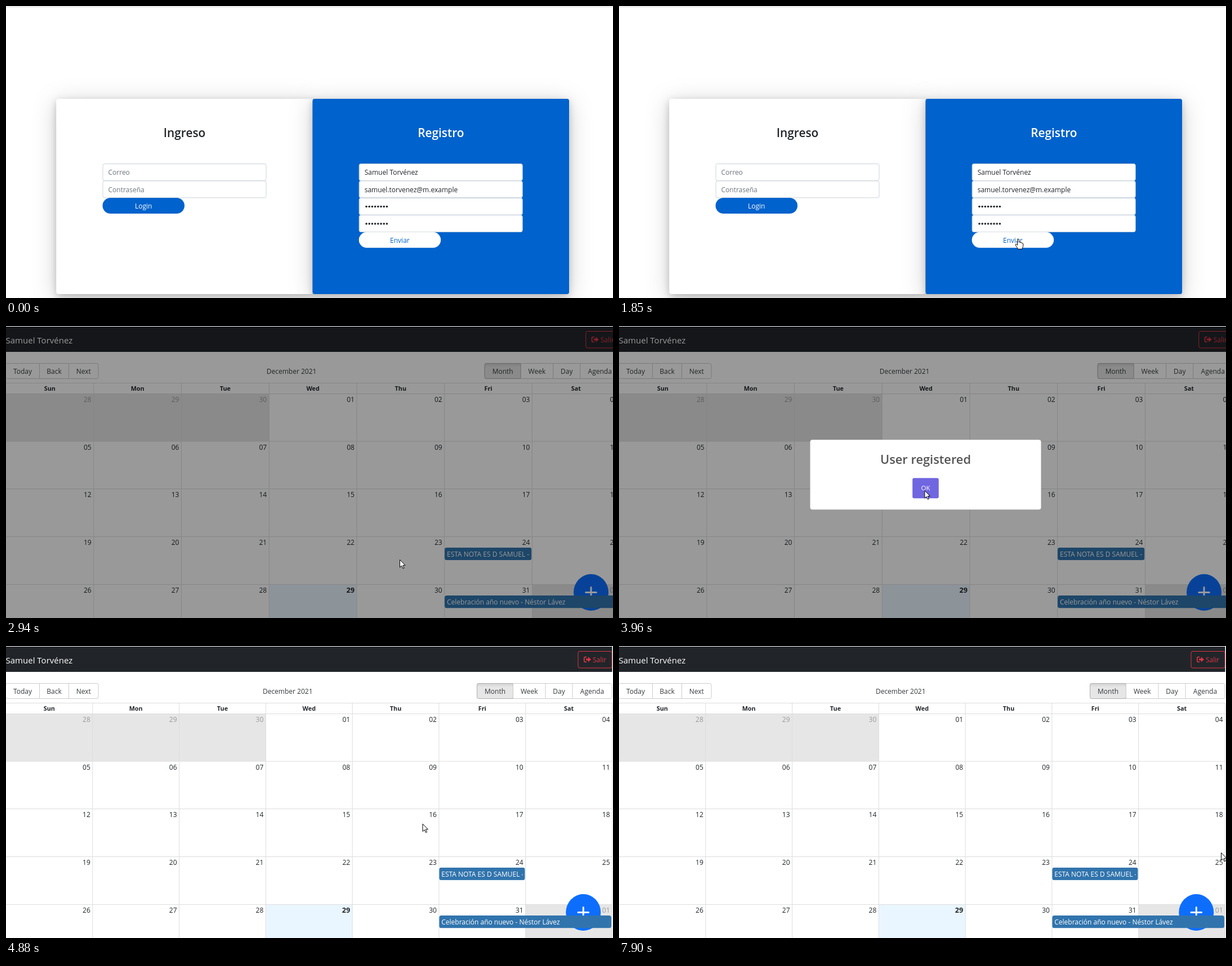
An HTML page for the animation above (8 s loop, 1078x519 px).

```html
<!DOCTYPE html>
<html lang="es">
<head>
<meta charset="utf-8">
<title>Agenda</title>
<style>
html, body { margin: 0; width: 100%; height: 100%; overflow: hidden; background: #fff; }
svg { display: block; }
text { font-family: "Open Sans", "Noto Sans", sans-serif; white-space: pre; }
.soft { filter: drop-shadow(0 7.2px 20.8px rgba(0,0,0,.19)); }
.near { filter: drop-shadow(0 4px 6.4px rgba(0,0,0,.2)); }
</style>
</head>
<body>
<svg id="stage" width="1078" height="519" viewBox="0 0 1078 519">
  <defs>
    <linearGradient id="press" x2="0" y2="1">
      <stop offset="0" stop-color="#d2d2d2"/><stop offset=".25" stop-color="#e6e6e6"/>
    </linearGradient>
  </defs>
  <g id="login"></g>
  <g id="wide"></g>
  <g id="narrow"></g>
  <rect id="status" x="-2" y="510.5" width="362.5" height="20" rx="3" fill="#f1f3f4" stroke="#cfd2d6"/>
  <rect id="shade" y="1" width="1078" height="518"/>
  <g id="modal"></g>
  <path id="arrow" d="M.5.5V14L3.7 11.1 6 16 8 15.1 5.8 10.3H10Z" fill="#fff" stroke="#000" stroke-linejoin="round"/>
  <path id="hand" d="M-1.4 8V1.2C-1.4-.4 1.3-.4 1.3 1.2V6.2C1.6 5 4 5.2 4 6.8 4.5 5.8 6.5 6.2 6.5 7.7 7.2 7 8.7 7.4 8.7 8.8V12.5C8.7 14.4 7.3 15.4 7 18H-.6C-1 15.6-3.5 13.7-4.9 10.7-5.4 9.1-3.5 8.6-2.6 9.8L-1.4 11.2Z" fill="#fff" stroke="#000" stroke-linejoin="round"/>
</svg>
<script>
const LOOP = 8000;
const USER = "Samuel Torvénez";
const $ = id => document.getElementById(id);
const BLUE = "#0062cc", INK = "#212529";

const rect = (x, y, w, h, fill, more = "") =>
  `<rect x="${x}" y="${y}" width="${w}" height="${h}" fill="${fill}" ${more}/>`;
const text = (x, y, str, fill = INK, size = 12, more = "") =>
  `<text x="${x}" y="${y}" fill="${fill}" font-size="${size}" ${more}>${str}</text>`;
const MID = 'text-anchor="middle"', END = 'text-anchor="end"';
const line = (x1, y1, x2, y2) => `<path d="M${x1} ${y1}L${x2} ${y2}" stroke="#ddd"/>`;

// ---- sign-in page ----
function card(x, fill, title, ink) {
  const shape = cls => rect(x, 165, 455.3, 347, fill, `rx="4" class="${cls}"`);
  return shape("soft") + shape("near") +
    text(x + 227.7, 233, title, ink, 20.8, MID + ' font-weight="600"');
}
const field = (x, row, str, ink) =>
  rect(x + .5, 280.5 + row * 30.4, 290, 29.9, "#fff", 'rx="3" stroke="#ced4da"') +
  text(x + 10, 300.3 + row * 30.4, str, ink);
const pill = (x, y, str, fill, ink) =>
  rect(x, y, 145.5, 28, fill, 'rx="14"') + text(x + 72.7, y + 18.8, str, ink, 12, MID);
const dots = y => Array.from({ length: 8 }, (_, i) =>
  `<circle cx="${640 + i * 5.2}" cy="${y}" r="1.8" fill="${INK}"/>`).join("");

$("login").innerHTML =
  rect(0, 1, 1078, 1, "#d3d3d3") +
  card(89.3, "#fff", "Ingreso", INK) +
  field(171.5, 0, "Correo", "#6c757d") + field(171.5, 1, "Contraseña", "#6c757d") +
  pill(171.5, 341, "Login", BLUE, "#fff") +
  card(544.6, BLUE, "Registro", "#fff") +
  field(626.7, 0, USER, INK) + field(626.7, 1, "samuel.torvenez@m.example", INK) +
  field(626.7, 2, "", INK) + field(626.7, 3, "", INK) + dots(356.5) + dots(387) +
  pill(626.7, 401.8, "Enviar", "#fff", BLUE);

// ---- calendar page, laid out for a given width ----
const ROWS = [120.5, 205, 289.5, 374.5, 459.5, 545];

function group(edges, labels, active) {
  const a = edges[0], b = edges[edges.length - 1];
  let s = rect(a, 66.5, b - a, 27, "#fff", 'rx="3" stroke="#ccc"');
  labels.forEach((name, i) => {
    const l = edges[i], r = edges[i + 1];
    if (i) s += `<path d="M${l} 66.5v27" stroke="#ccc"/>`;
    if (name === active) s += rect(l, 66.5, r - l, 27, "url(#press)", 'rx="3" stroke="#adadad"');
    s += text((l + r) / 2, 84.5, name, "#373a3c", 12, MID);
  });
  return s;
}

const eventBar = (x, y, w, str) =>
  `<svg x="${x}" y="${y}" width="${w}" height="22.5">` +
  rect(0, 0, w, 22.5, "#3174ad", 'rx="4"') +
  `<svg width="${w - 4}" height="22">${text(4, 16, str, "#fff")}</svg></svg>`;

function calendar(W) {
  const col = W / 7, off = W - 1076.5, cell = "#e6e6e6";
  let s = rect(0, 0, 1078, 519, "#fff") + rect(0, 1, W, 45, INK) +
    text(-.5, 30.5, USER, "#fff", 15);

  s += `<g transform="translate(${off} 0)">` +
    rect(1016, 9.5, 60, 29.5, "none", 'rx="3" stroke="#dc3545"') +
    '<path d="M1031 19.6h-2.6q-1.6 0-1.6 1.6v5.6q0 1.6 1.6 1.6h2.6" fill="none" stroke="#dc3545" stroke-width="1.7"/>' +
    '<path d="M1030 22.6h3.8v-3.4l5.2 4.8-5.2 4.8v-3.4h-3.8z" fill="#dc3545"/>' +
    text(1042, 28.5, "Salir", "#dc3545") +
    group([836.5, 900.5, 958, 1006, 1076], ["Month", "Week", "Day", "Agenda"], "Month") + "</g>";
  s += group([-.5, 59.5, 111.5, 164], ["Today", "Back", "Next"]) +
    text(W / 2 - 38, 84.5, "December 2021", "#373a3c", 12, MID);

  s += rect(0, ROWS[0], col * 3, ROWS[1] - ROWS[0], cell) +
    rect(col * 3, ROWS[4], col, 60, "#eaf6ff") + rect(col * 6, ROWS[4], col, 60, cell);
  s += line(0, 101.5, W, 101.5);
  for (let r = 0; r < 5; r++) s += line(0, ROWS[r], W, ROWS[r]);
  "Sun Mon Tue Wed Thu Fri Sat".split(" ").forEach((day, c) => {
    const right = (c + 1) * col;
    s += line(right, 101.5, right, 519) +
      text(right - col / 2, 115, day, INK, 10.8, MID + ' font-weight="700"');
    for (let r = 0; r < 5; r++) {
      const date = new Date(2021, 10, 28 + r * 7 + c);
      const inside = date.getMonth() === 11, today = inside && date.getDate() === 29;
      s += text(right - 4, ROWS[r] + 14.8, String(date.getDate()).padStart(2, "0"),
        inside ? INK : "#999", today ? 12.6 : 12, END + (today ? ' font-weight="700"' : ""));
    }
  });

  s += `<g transform="translate(${off} 0)"><ellipse cx="1025.3" cy="473.5" rx="31" ry="32.5" fill="#0d6efd"/>` +
    '<path d="M1016 473.5h18.6M1025.3 464.5v18" stroke="#fff" stroke-width="3" stroke-linecap="round"/></g>';
  return s + eventBar(col * 5 + .3, 393.7, col - 1.3, "ESTA NOTA ES D SAMUEL -") +
    eventBar(col * 5 + .3, 479, col * 2 - 1.8, "Celebración año nuevo - Néstor Lávez");
}
$("wide").innerHTML = calendar(1090.2);
$("narrow").innerHTML = calendar(1076.5);

$("modal").innerHTML = rect(-205, -62, 410, 124, "#fff", 'rx="4"') +
  text(0, -19, "User registered", "#545454", 21.8, MID + ' font-weight="600"') +
  `<g id="ok">${rect(-23.3, 6, 46.6, 36, "#7066e0", 'rx="3"')}${text(0, 28, "OK", "#fff", 11.5, MID)}</g>`;

// ---- motion ----
const GONE = 2450, CALENDAR = 2940, POPUP = 3010, CLOSE = 4153, CLOSED = CLOSE + 150;

// time, x, y of the pointer tip
const PATH = [
  [100, 967, 497], [500, 908, 458], [900, 858, 430], [1350, 765, 421], [1750, 712, 412],
  [1850, 709, 414], [2640, 699, 415], [3300, 699, 415], [4000, 541, 291], [4540, 541, 291],
  [4740, 660, 362], [4880, 739, 316], [5340, 936, 164], [5580, 978, 66], [5800, 1066, 112],
  [6030, 1040, 215], [6240, 1056, 256], [6370, 1057, 441], [6600, 1040, 464], [7020, 992, 452],
  [7300, 1008, 486], [7600, 1045, 440], [7900, 1069, 367]
];

// smooth curve through the points that never overshoots them
function along(k, t) {
  const n = PATH.length - 1;
  const slope = i => i < 0 || i >= n ? 0 : (PATH[i + 1][k] - PATH[i][k]) / (PATH[i + 1][0] - PATH[i][0]);
  const tangent = i => {
    const a = slope(i - 1), b = slope(i);
    return a * b > 0 ? 2 * a * b / (a + b) : 0;
  };
  if (t >= PATH[n][0]) return PATH[n][k];
  const i = Math.max(0, PATH.findIndex(p => p[0] > t) - 1);
  const h = PATH[i + 1][0] - PATH[i][0], u = (t - PATH[i][0]) / h, v = 1 - u;
  return PATH[i][k] * (1 + 2 * u) * v * v + tangent(i) * h * u * v * v +
    PATH[i + 1][k] * u * u * (3 - 2 * u) - tangent(i + 1) * h * u * u * v;
}

function overPlus(x, y) {
  return Math.hypot((x - 1025.3) / 31, (y - 473.5) / 32.5) < 1 || (y > 479 && y < 501.5 && x < 1075);
}

function popScale(q) {
  const stops = [[0, .7], [.45, 1.05], [.8, .95], [1, 1]];
  const i = q < .45 ? 0 : q < .8 ? 1 : 2;
  const [a, from] = stops[i], [b, to] = stops[i + 1];
  return from + (to - from) * (q - a) / (b - a);
}

const show = (id, on) => $(id).style.display = on ? "" : "none";

function draw(t) {
  show("login", t < GONE);
  show("status", t >= GONE && t < 2740);
  show("wide", t >= CALENDAR && t < CLOSED);
  show("narrow", t >= CLOSED);

  const out = Math.min(1, Math.max(0, (t - CLOSE) / 150)), fade = 1 - out;
  show("shade", t >= CALENDAR && t < CLOSED);
  $("shade").setAttribute("fill-opacity", .4 * fade);
  show("modal", t >= POPUP && t < CLOSED);
  const scale = out ? 1 - out / 2 : popScale(Math.min(1, Math.max(0, (t - POPUP) / 300)));
  $("modal").setAttribute("transform", `translate(544.5 264.3) scale(${scale})`);
  $("modal").setAttribute("opacity", fade);
  $("ok").setAttribute("opacity", fade);

  const x = along(1, t), y = along(2, t);
  const pointing = t < GONE ? x < 772 && y > 402 && y < 430 : t >= CLOSED && overPlus(x, y);
  show("arrow", t >= 100 && !pointing);
  show("hand", t >= 100 && pointing);
  $(pointing ? "hand" : "arrow").setAttribute("transform", `translate(${x} ${y})`);
}

function tick(now) {
  draw(now % LOOP);
  requestAnimationFrame(tick);
}
draw(0);
requestAnimationFrame(tick);
</script>
</body>
</html>
```
